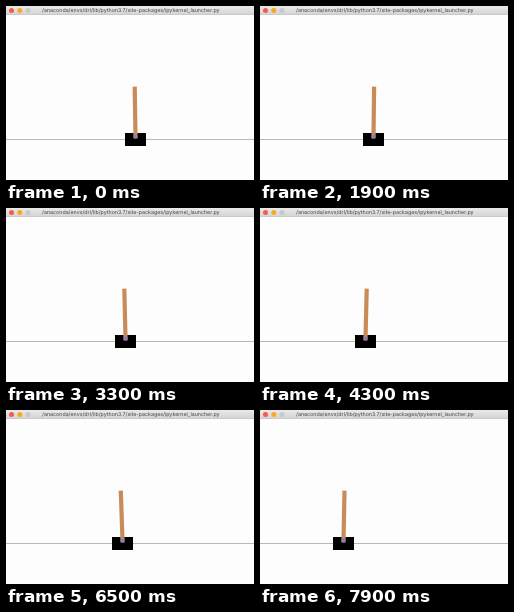
An HTML page for the animation above (8000 ms loop, 248 by 174 pixels).

```html
<!DOCTYPE html>
<html lang="en">
<head>
<meta charset="utf-8">
<title>Cart pole</title>
<style>
  html, body { margin: 0; width: 100%; height: 100%; overflow: hidden; background: #fdfdfd; }
  svg { display: block; width: 248px; height: 174px; }
  text { font: 5.3px Inter, "Open Sans", sans-serif; fill: #444; text-rendering: geometricPrecision; }
</style>
</head>
<body>
<svg viewBox="0 0 248 174">
  <defs>
    <linearGradient id="bar" x2="0" y2="1">
      <stop stop-color="#e9e9e9"/>
      <stop offset="1" stop-color="#d3d3d3"/>
    </linearGradient>
  </defs>
  <rect width="248" height="174" fill="#fdfdfd"/>
  <rect width="248" height="9" fill="url(#bar)"/>
  <rect y="8.6" width="248" height=".4" fill="#b8b8b8"/>
  <circle cx="5.5" cy="4.4" r="2.5" fill="#f45c48"/>
  <circle cx="13.8" cy="4.4" r="2.5" fill="#f9a826"/>
  <circle cx="22" cy="4.4" r="2.5" fill="#c8c8c8"/>
  <text x="124.8" y="6.3" text-anchor="middle">/anaconda/envs/drl/lib/python3.7/site-packages/ipykernel_launcher.py</text>

  <rect y="133" width="248" height="1" fill="#b8b8b8"/>
  <g id="cart">
    <rect x="-10.5" y="127" width="21" height="13" fill="#000"/>
    <g id="pole">
      <rect x="-2.1" y="80.6" width="4.2" height="51.9" fill="#c98c58"/>
    </g>
    <circle cy="130.4" r="2" fill="#8080c8"/>
  </g>
</svg>
<script>
  const LOOP = 8000, STEP = 100, AXLE_Y = 130.4, REACH = 49.8;
  const cart = document.getElementById('cart');
  const pole = document.getElementById('pole');

  // turning points of the swing
  const keys = [
    { t: 0, x: 129.5, lean: -0.8 },
    { t: 1900, x: 113.5, lean: 0.6 },
    { t: 2300, x: 123.5, lean: -0.4 },
    { t: 3300, x: 119, lean: -1.2 },
    { t: 4600, x: 103.5, lean: 1.6 },
    { t: 5600, x: 127.5, lean: -1.4 },
    { t: 6500, x: 116.5, lean: -1.7 },
    { t: 7900, x: 83, lean: 1 }
  ];

  // level at the ends and wherever the direction reverses
  function slope(i, prop) {
    const a = keys[i - 1], k = keys[i], b = keys[i + 1];
    if (!a || !b || (k[prop] - a[prop]) * (b[prop] - k[prop]) <= 0) return 0;
    return (b[prop] - a[prop]) / (b.t - a.t);
  }

  // cubic Hermite curve through the keys
  function valueAt(t, prop) {
    const next = keys.findIndex(k => k.t > t);
    if (next < 0) return keys.at(-1)[prop];
    const p = keys[next - 1], q = keys[next], span = q.t - p.t;
    const u = (t - p.t) / span, v = 1 - u;
    return v * v * (1 + 2 * u) * p[prop] + u * u * (1 + 2 * v) * q[prop]
      + u * v * span * (v * slope(next - 1, prop) - u * slope(next, prop));
  }

  function draw(now) {
    const t = Math.floor((now % LOOP) / STEP) * STEP;
    const x = Math.round(valueAt(t, 'x') - 0.5) + 0.5; // cart edges on whole pixels
    const angle = Math.asin(valueAt(t, 'lean') / REACH) * 180 / Math.PI;
    cart.setAttribute('transform', `translate(${x} 0)`);
    pole.setAttribute('transform', `rotate(${angle.toFixed(2)} 0 ${AXLE_Y})`);
  }

  const start = performance.now();
  function tick() {
    draw(performance.now() - start);
    requestAnimationFrame(tick);
  }
  tick();
</script>
</body>
</html>
```
